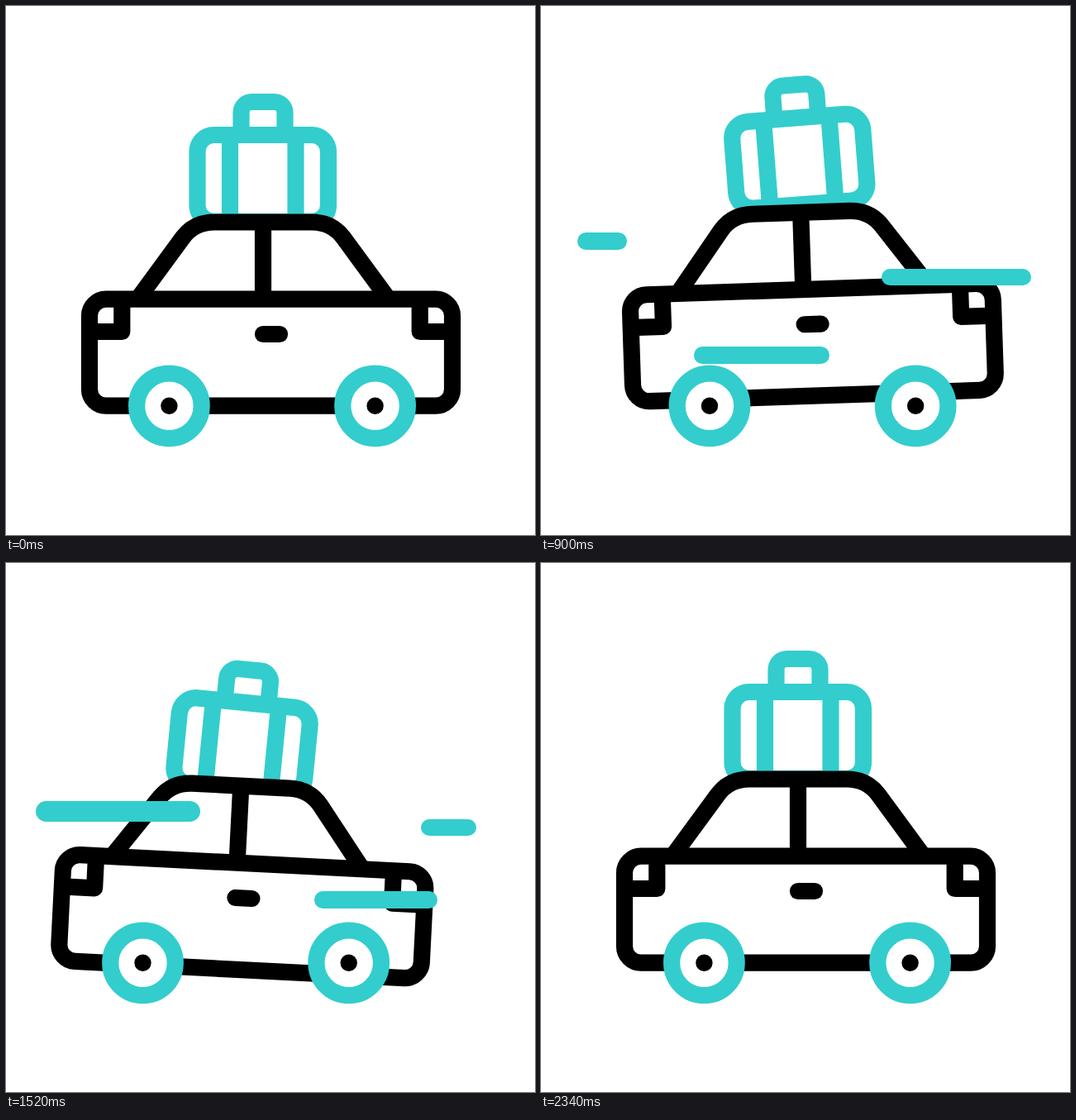
Animation of 640 by 640 pixels, one loop 2.42 s. Source, as an HTML page:

```html
<!DOCTYPE html>
<html lang="en">
<head>
<meta charset="utf-8">
<title>Car with luggage</title>
<style>
  html, body { margin: 0; width: 100%; height: 100%; overflow: hidden; background: #fff; }
  .stage { position: relative; width: 640px; height: 640px; overflow: hidden; --teal: #33cdcd; }
  svg { position: absolute; inset: 0; display: block; }
  .line { fill: none; stroke: #000; stroke-width: 20.2; stroke-linejoin: round; }
  .teal { stroke: var(--teal); }
  .white { fill: #fff; }
  .round { stroke-linecap: round; }

  .drive, .body, .case {
    animation: 2420ms cubic-bezier(.37, 0, .63, 1) infinite;
  }
  .drive { animation-name: drive; }
  .body { animation-name: bounce, tilt; transform-origin: 320.5px 364px; }
  .case { animation-name: hop, sway; transform-origin: 311px 188px; }

  @keyframes drive {
    0%, 89.26%, 100% { translate: 0 0; }
    23.55% { translate: -45.4px 0; }
    46.07% { translate: 32.5px 0; }
    66.94% { translate: -38.3px 0; }
  }
  @keyframes bounce {
    0%, 96.69%, 100% { translate: 0 0; }
    19.75% { translate: 0 11px; }
    39.79% { translate: 0 -13px; }
    59.83% { translate: 0 9.8px; }
    79.88% { translate: 0 -14.5px; }
  }
  @keyframes tilt {
    0%, 89.67%, 100% { rotate: 0deg; }
    26.86% { rotate: -3deg; }
    63.22% { rotate: 2.9deg; }
  }
  @keyframes hop {
    0%, 2.89%, 90.91%, 100% { translate: 0 0; }
    22.73% { translate: 0 12.6px; }
    42.56% { translate: 0 -13.4px; }
    59.92% { translate: 0 6px; }
    73.97% { translate: 0 -6px; }
  }
  @keyframes sway {
    0%, 90.08%, 100% { rotate: 0deg; }
    31.4% { rotate: -2.9deg; }
    66.94% { rotate: 2.9deg; }
  }

  /* Wind streaks: --a is the left limit, --b the right limit, --d the thickness */
  .wind {
    --d: 20.5px;
    position: absolute;
    height: var(--d);
    border-radius: 99px;
    background: var(--teal);
    opacity: 0;
    animation: head 2420ms cubic-bezier(.37, 0, .63, 1) var(--t) infinite,
               tail 2420ms cubic-bezier(.37, 0, .63, 1) var(--t) infinite,
               show 2420ms step-end var(--t) infinite;
  }
  @keyframes head {
    0% { left: calc(var(--b) - var(--d)); }
    16.12%, 100% { left: var(--a); }
  }
  @keyframes tail {
    0%, 11.45% { right: calc(640px - var(--b)); }
    27.56%, 100% { right: calc(640px - var(--a) - var(--d)); }
  }
  @keyframes show {
    0% { opacity: 1; }
    27.56%, 100% { opacity: 0; }
  }
</style>
</head>
<body>
<div class="stage">
  <svg width="640" height="640" viewBox="0 0 640 640">
    <defs>
      <g id="wheel">
        <circle class="line teal white" r="39.3"/>
        <circle r="10.2"/>
      </g>
    </defs>
    <g class="drive">
      <g class="body">
        <g class="case line teal">
          <rect x="231.5" y="156" width="158.5" height="105" rx="20"/>
          <path d="M271 156V261M350.5 156V261"/>
          <path d="M284.5 156V129a13 13 0 0 1 13-13H324.5a13 13 0 0 1 13 13V156"/>
        </g>
        <path class="line white" d="M159 355L214 280Q228 261.5 252 261.5H370Q394 261.5 408 280L463 355"/>
        <rect class="line white" x="101" y="354.7" width="439" height="129" rx="20"/>
        <path class="line" d="M311 261V355M101 394H140.3V355M540 394H500.7V355"/>
        <path class="line round" d="M311 397H331"/>
      </g>
      <use href="#wheel" x="197.4" y="483.8"/>
      <use href="#wheel" x="446.6" y="483.8"/>
    </g>
  </svg>
  <div class="wind" style="--a: 43.5px; --b: 264px; --t: 349ms; top: 274px"></div>
  <div class="wind" style="--a: 185px; --b: 404.5px; --t: 485ms; top: 412px"></div>
  <div class="wind" style="--a: 399px; --b: 599px; --t: 578ms; top: 317.5px"></div>
  <div class="wind" style="--a: 373px; --b: 571.5px; --t: 1105ms; top: 397px"></div>
  <div class="wind" style="--a: 18px; --b: 238.5px; --d: 25px; --t: 1208ms; top: 288px"></div>
  <div class="wind" style="--a: 354.5px; --b: 569px; --t: 1394ms; top: 309.8px"></div>
</div>
</body>
</html>
```
